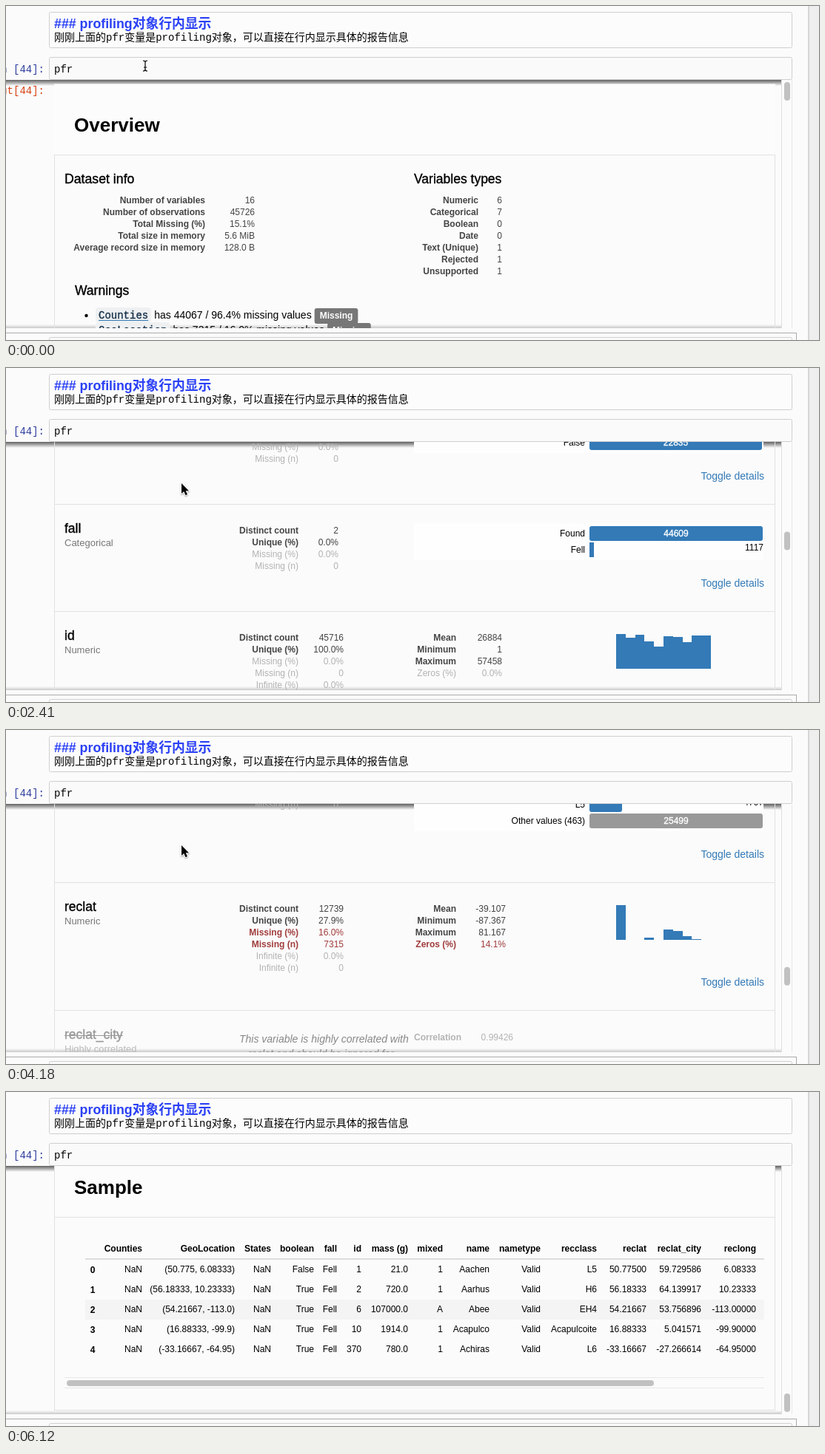
Animation, 1098 px wide and 452 px high, one loop 6.67 s. Source, as an HTML page with a canvas:

```html
<!DOCTYPE html>
<html lang="zh">
<head>
<meta charset="utf-8">
<title>Profiling report</title>
<style>
html, body { margin: 0; width: 100%; height: 100%; overflow: hidden; background: #fbfbfb; }
canvas { display: block; width: 1098px; height: 452px; }
</style>
</head>
<body>
<canvas id="stage" width="1098" height="452"></canvas>
<script>
const ctx = document.getElementById('stage').getContext('2d');
const LOOP = 6670;
const SANS = '"Liberation Sans", "Noto Sans CJK SC", "Noto Sans CJK", sans-serif';
const MONO = '"Liberation Mono", "Noto Sans CJK SC", "Noto Sans CJK", monospace';
const BLUE = '#337ab7', RED = '#a03c3c', PALE = '#b3b3b3', DARK = '#444', EDGE = '#e2e2e2';

// start, end, number of steps, value reached
const scrollKeys = [
  [500, 610, 2, 8], [760, 1080, 5, 32], [1190, 1340, 3, 260], [1430, 1520, 2, 470],
  [1970, 1970, 1, 544], [2060, 2410, 5, 1300], [2670, 3120, 6, 1944], [3440, 3790, 5, 2330],
  [4180, 4180, 1, 2387], [4270, 4630, 5, 3070], [4890, 4890, 1, 3146], [4980, 5070, 2, 3344]
];
const MAX_SCROLL = 3344;

function stepped(t, t0, t1, n) {
  if (t < t0) return 0;
  const k = t1 > t0 ? Math.floor((t - t0) / (t1 - t0) * (n - 1) + 1e-6) : n;
  return Math.min(1, (k + 1) / n);
}

function scrollAt(t) {
  let v = 0;
  for (const [t0, t1, n, to] of scrollKeys) v += (to - v) * stepped(t, t0, t1, n);
  return Math.round(v);
}

function pointerAt(t) {
  const a = stepped(t, 120, 320, 4), b = stepped(t, 5510, 6120, 11);
  return {
    x: 188 + 49 * a + 703 * b ** 1.4,
    y: 81 + 75 * a + 300 * b ** 1.5,
    shown: b < 1
  };
}

function text(str, x, y, o = {}) {
  const size = o.size || 12;
  ctx.font = `${o.italic ? 'italic ' : ''}${o.bold ? 'bold ' : ''}${size}px ${o.mono ? MONO : SANS}`;
  ctx.textAlign = o.align || 'left';
  ctx.fillStyle = o.color || '#000';
  const base = Math.round(y + size * 0.35);
  ctx.fillText(str, x, base);
  if (o.medium) {
    ctx.strokeStyle = ctx.fillStyle;
    ctx.lineWidth = 0.35;
    ctx.strokeText(str, x, base);
  }
  return ctx.measureText(str).width;
}

const right = (str, x, y, o) => text(str, x, y, { ...o, align: 'right' });

function rect(x, y, w, h, color) {
  ctx.fillStyle = color;
  ctx.fillRect(x, y, w, h);
}

function round(x, y, w, h, r, color) {
  ctx.fillStyle = color;
  ctx.beginPath();
  ctx.roundRect(x, y, w, h, r);
  ctx.fill();
}

function frame(x, y, w, h, fill, line) {
  round(x, y, w, h, 2, fill);
  ctx.strokeStyle = line;
  ctx.lineWidth = 1;
  ctx.beginPath();
  ctx.roundRect(x + 0.5, y + 0.5, w - 1, h - 1, 2);
  ctx.stroke();
}

const rule = (y, color = EDGE) => rect(65, y, 974, 1, color);

// rows: [label, value, color]
function table(rows, labelX, valueX, y) {
  rows.forEach(([label, value, color = DARK], i) => {
    right(label, labelX, y + i * 16, { bold: color !== PALE, color });
    right(value, valueX, y + i * 16, { color });
  });
}

function header(title, y, first) {
  rect(65, y, 974, 96, '#fcfcfc');
  rule(y, first ? EDGE : '#d9d9d9');
  text(title, 92, y + 56, { size: 26, bold: true });
  rule(y + 96);
}

const missing = (n, p) => [`has ${n} / ${p}% missing values`, 'Missing'];
const distinct = n => [`has a high cardinality: ${n} distinct values`, 'Warning'];
const zeros = (n, p) => [`has ${n} / ${p}% zeros`, 'Zeros'];
const warnings = [
  ['Counties', ...missing(44067, 96.4)],
  ['GeoLocation', ...missing(7315, '16.0')],
  ['GeoLocation', ...distinct(17101)],
  ['States', ...missing(44067, 96.4)],
  ['mass (g)', 'is highly skewed (γ1 = 76.918)', 'Skewed'],
  ['recclass', ...distinct(466)],
  ['reclat', ...missing(7315, '16.0')],
  ['reclat', ...zeros(6438, 14.1)],
  ['reclat_city', 'is highly correlated with reclat (ρ = 0.99426)', 'Rejected'],
  ['reclong', ...missing(7315, '16.0')],
  ['reclong', ...zeros(6214, 13.6)],
  ['year', 'is an unsupported type, check if it needs cleaning or further analysis', 'Warning']
];

function warning([name, msg, tag], y) {
  ctx.fillStyle = '#000';
  ctx.beginPath();
  ctx.arc(108.5, y + 1, 2.2, 0, 7);
  ctx.fill();
  const w = name.length * 8.4;
  round(121, y - 10, w + 8, 20, 4, '#eef0f1');
  text(name, 125, y, { size: 14, mono: true, color: '#17304a', medium: true });
  rect(125, y + 7, w, 1, BLUE);
  const x = 121 + w + 12;
  const end = x + text(msg, x, y, { size: 14 }) + 4;
  ctx.font = `bold 12px ${SANS}`;
  const tw = ctx.measureText(tag).width;
  round(end, y - 9, tw + 14, 21, 3, tag === 'Warning' ? '#f0ad4e' : '#777');
  text(tag, end + 7, y + 1, { bold: true, color: '#fff' });
}

function overview(y) {
  header('Overview', y, true);
  text('Dataset info', 79, y + 129, { size: 17.7, medium: true });
  text('Variables types', 551, y + 129, { size: 17.5, medium: true });
  table([['Number of variables', '16'], ['Number of observations', '45726'],
    ['Total Missing (%)', '15.1%'], ['Total size in memory', '5.6 MiB'],
    ['Average record size in memory', '128.0 B']], 269, 336, y + 158);
  table([['Numeric', '6'], ['Categorical', '7'], ['Boolean', '0'], ['Date', '0'],
    ['Text (Unique)', '1'], ['Rejected', '1'], ['Unsupported', '1']], 638, 670, y + 158);
  text('Warnings', 93, y + 280, { size: 17.5, medium: true });
  warnings.forEach((w, i) => warning(w, y + 313 + i * 20));
}

function caption(name, kind, y, muted) {
  const w = text(name, 79, y + 33, { size: 17.5, medium: true, color: muted ? '#999' : '#000' });
  if (muted) rect(79, y + 34, w, 1, '#999');
  text(kind, 79, y + 52, { size: 13, color: muted ? '#bbb' : '#777' });
}

const toggle = y => right('Toggle details', 1024, y, { size: 14, color: BLUE });

function counts(v, y, x) {
  const [count, unique, pct, n] = v;
  const c = n === '0' || n === '10' ? PALE : RED;
  table([['Distinct count', count], ['Unique (%)', unique],
    ['Missing (%)', pct, c], ['Missing (n)', n, c]], 395, x, y + 36);
}

function numeric(y, d) {
  caption(d.name, 'Numeric', y);
  counts(d.counts, y, 456);
  table([['Infinite (%)', '0.0%', PALE], ['Infinite (n)', '0', PALE]], 395, 456, y + 100);
  const [mean, min, max, zero] = d.stats;
  const zc = parseFloat(zero) > 5 ? RED : PALE;
  table([['Mean', mean], ['Minimum', min], ['Maximum', max], ['Zeros (%)', zero, zc]],
    608, d.edge || 670, y + 36);
  d.hist.forEach((h, i) => {
    const x = Math.round(824 + i * 12.8);
    rect(x, y + 78 - h, Math.round(824 + (i + 1) * 12.8) - x, h, BLUE);
  });
  toggle(y + 135);
}

function categorical(y, d) {
  caption(d.name, 'Categorical', y);
  counts(d.counts, y, 449);
  rect(551, y + 26, 472, d.bars.length * 22 + 6, '#fefefe');
  const peak = Math.max(...d.bars.map(b => b[1]));
  d.bars.forEach(([label, n], i) => {
    const by = y + 30 + i * 22, w = Math.max(3, Math.round(234 * n / peak));
    const lost = label === '(Missing)';
    const color = lost ? RED : label.startsWith('Other') ? '#999' : BLUE;
    right(label, 782, by + 10, { color: lost ? RED : '#000' });
    round(788, by, w, 20, w > 6 ? 3 : 0, color);
    if (w > 60) text(n, 788 + w / 2, by + 10, { align: 'center', color: '#fff', medium: true });
    else right(String(n), 1023, by + 7, { color: lost ? RED : '#000' });
  });
  toggle(y + d.h - 38);
}

function unique(y, d) {
  caption(d.name, 'Categorical, Unique', y);
  [['First 3 values', 315], ['Last 3 values', 551]].forEach(([s, x]) => {
    const w = text(s, x, y + 37, { bold: true, color: DARK });
    rect(x, y + 44, w, 1, '#222');
  });
  toggle(y + 79);
}

function excluded(y, d) {
  caption(d.name, d.kind, y, true);
  d.lines.forEach((s, i) => text(s, 315, y + 39 + i * 20, { size: 14, italic: true, color: '#888' }));
  if (d.value) {
    text('Correlation', 551, y + 37, { bold: true, color: PALE });
    right(d.value, 685, y + 37, { color: PALE });
  }
}

const num = (name, counts, stats, hist, edge) => ({ name, counts, stats, hist, edge, h: 173, draw: numeric });
const cat = (name, counts, bars) => ({ name, counts, bars, h: 101 + 22 * bars.length, draw: categorical });
const none = ['0.0%', '0'], some = ['0.0%', '10'], lost = ['16.0%', '7315'], most = ['96.4%', '44067'];

const variables = [
  num('Counties', ['663', '1.4%', ...most], ['1353.3', '5', '3210', '0.0%'], [47, 17, 31, 23, 11, 6, 36, 20, 11, 19]),
  cat('GeoLocation', ['17101', '37.4%', ...lost], [['(0.0, 0.0)', 6214], ['(-71.5, 35.66667)', 4761],
    ['(-84.0, 168.0)', 3040], ['Other values (17097)', 24396], ['(Missing)', 7315]]),
  num('States', ['46', '0.1%', ...most], ['17.7', '1', '51', '0.0%'], [12, 47, 20, 8, 10, 24, 6, 9, 5, 4]),
  cat('boolean', ['2', '0.0%', ...none], [['True', 22891], ['False', 22835]]),
  cat('fall', ['2', '0.0%', ...none], [['Found', 44609], ['Fell', 1117]]),
  num('id', ['45716', '100.0%', ...none], ['26884', '1', '57458', '0.0%'], [47, 42, 46, 37, 30, 44, 43, 36, 45, 45]),
  num('mass (g)', ['12577', '27.5%', '0.3%', '131'], ['13278', '0', '6e+07', '0.0%'], [47, 0, 0, 0, 0, 0, 0, 0, 0, 0]),
  cat('mixed', ['3', '0.0%', ...some], [['1', 23051], ['A', 22665], ['(Missing)', 10]]),
  { name: 'name', h: 117, draw: unique },
  cat('nametype', ['2', '0.0%', ...none], [['Valid', 45651], ['Relict', 75]]),
  cat('recclass', ['466', '1.0%', ...none], [['L6', 8287], ['H5', 7143], ['L5', 4797], ['Other values (463)', 25499]]),
  num('reclat', ['12739', '27.9%', ...lost], ['-39.107', '-87.367', '81.167', '14.1%'], [47, 0, 0, 3, 0, 14, 12, 5, 1, 0], 675),
  { name: 'reclat_city', kind: 'Highly correlated', h: 118, draw: excluded, value: '0.99426',
    lines: ['This variable is highly correlated with', '   reclat and should be ignored for', 'analysis'] },
  num('reclong', ['14641', '32.0%', ...lost], ['61.053', '-165.43', '354.47', '13.6%'], [1, 4, 5, 18, 26, 9, 2, 47, 0, 0], 675),
  cat('source', ['2', '0.0%', ...some], [['ARCH', 45716], ['(Missing)', 10]]),
  { name: 'year', kind: 'Unsupported', h: 118, draw: excluded,
    lines: ['This variable is an unsupported type,', 'check if it needs cleaning or further', 'analysis'] }
];

const columns = [['Counties', 184], ['GeoLocation', 309], ['States', 358], ['boolean', 416], ['fall', 447],
  ['id', 480], ['mass (g)', 543], ['mixed', 590], ['name', 653], ['nametype', 722], ['recclass', 798],
  ['reclat', 865], ['reclat_city', 939], ['reclong', 1013]];
const records = [
  'NaN|(50.775, 6.08333)|NaN|False|Fell|1|21.0|1|Aachen|Valid|L5|50.77500|59.729586|6.08333',
  'NaN|(56.18333, 10.23333)|NaN|True|Fell|2|720.0|1|Aarhus|Valid|H6|56.18333|64.139917|10.23333',
  'NaN|(54.21667, -113.0)|NaN|True|Fell|6|107000.0|A|Abee|Valid|EH4|54.21667|53.756896|-113.00000',
  'NaN|(16.88333, -99.9)|NaN|True|Fell|10|1914.0|1|Acapulco|Valid|Acapulcoite|16.88333|5.041571|-99.90000',
  'NaN|(-33.16667, -64.95)|NaN|True|Fell|370|780.0|1|Achiras|Valid|L6|-33.16667|-27.266614|-64.95000'
].map(r => r.split('|'));

function sample(y, pointerY) {
  const hover = Math.min(2, Math.floor((pointerY - y - 58) / 27));
  if (hover >= 0) rect(107, y + 58 + hover * 27, 917, 27, '#f4f4f4');
  columns.forEach(([s, x]) => right(s, x, y + 43, { bold: true }));
  rect(107, y + 56, 917, 2, '#dcdcdc');
  records.forEach((r, i) => {
    const ry = y + 71 + i * 27;
    text(i, 117, ry + 1, { bold: true, align: 'center' });
    r.forEach((s, j) => right(s, columns[j][1], ry));
  });
  rect(79, y + 217, 945, 1, '#e8e8e8');
  rect(79, y + 231, 945, 1, '#e8e8e8');
  round(82, y + 221, 793, 8, 4, '#c1c1c1');
  rule(y + 261);
}

function report(s, pointerY) {
  let y = 106 - s;
  rect(65, Math.max(100, y), 1, 3774 - s - Math.max(100, y), EDGE);
  rect(1038, Math.max(100, y), 1, 3774 - s - Math.max(100, y), EDGE);
  right('Out[44]:', 52, 114 - s, { size: 14, mono: true, color: '#d84315' });
  overview(105 - s);
  header('Variables', 686 - s);
  y = 782 - s;
  for (const v of variables) {
    if (y < 436 && y + v.h > 100) v.draw(y, v);
    y += v.h;
    rule(y);
  }
  header('Correlations', y);
  header('Sample', y + 97);
  rect(65, y, 1, 193, EDGE);
  rect(1038, y, 1, 193, EDGE);
  sample(y + 193, pointerY);
}

function shade(y0, y1, alpha) {
  const g = ctx.createLinearGradient(0, y0, 0, y1);
  g.addColorStop(0, `rgba(0,0,0,${alpha})`);
  g.addColorStop(1, 'rgba(0,0,0,0)');
  rect(0, Math.min(y0, y1), 1047, Math.abs(y1 - y0), g);
}

function notebook() {
  rect(0, 0, 1098, 452, '#fbfbfb');
  rect(1083, 0, 15, 452, '#eee');
  rect(1083, 0, 2, 452, '#d6d6d6');
  frame(58, 8, 1004, 49, '#fcfcfc', '#cfcfcf');
  text('### profiling对象行内显示', 65, 24, { size: 17.8, bold: true, color: '#2b40f5' });
  text('刚刚上面的pfr变量是profiling对象，可以直接在行内显示具体的报告信息', 65, 42, { size: 14, mono: true });
  frame(58, 69, 1004, 31, '#fafafa', '#cfcfcf');
  right('In [44]:', 52, 85, { size: 14, mono: true, color: '#303f9f' });
  text('pfr', 65, 85, { size: 14, mono: true });
  rect(0, 442, 1068, 1, '#ababab');
  rect(1067, 442, 1, 10, '#ababab');
  frame(58, 448, 1004, 20, '#fafafa', '#cfcfcf');
}

function pointer({ x, y, shown }) {
  if (!shown) return;
  ctx.save();
  ctx.translate(Math.round(x), Math.round(y));
  ctx.lineJoin = 'round';
  if (y < 100) {
    ctx.strokeStyle = '#000';
    ctx.lineWidth = 1.2;
    ctx.stroke(new Path2D('M-3 -7Q0 -7 0 -5V5Q0 7 -3 7M3 -7Q0 -7 0 -5M0 5Q0 7 3 7M-2 2H2'));
  } else {
    const arrow = new Path2D('M0 0V14L3.2 11L5.6 16.2L8 15L5.7 10.2H10Z');
    ctx.strokeStyle = '#fff';
    ctx.lineWidth = 2;
    ctx.shadowColor = 'rgba(0,0,0,.35)';
    ctx.shadowBlur = 2;
    ctx.shadowOffsetY = 1;
    ctx.stroke(arrow);
    ctx.shadowColor = 'transparent';
    ctx.fillStyle = '#000';
    ctx.fill(arrow);
  }
  ctx.restore();
}

function draw(t) {
  const s = scrollAt(t), p = pointerAt(t);
  notebook();
  ctx.save();
  ctx.beginPath();
  ctx.rect(0, 100, 1062, 336);
  ctx.clip();
  shade(100, 108, 0.62);
  shade(436, 431, 0.2);
  report(s, t < 5510 ? 0 : p.y);
  rect(1047, 100, 1, 336, '#e0e0e0');
  rect(1061, 100, 1, 336, '#e8e8e8');
  round(1051, 103 + 305 * s / MAX_SCROLL, 8, 25, 4, '#c1c1c1');
  ctx.restore();
  pointer(p);
}

const start = performance.now();
function tick() {
  draw((performance.now() - start) % LOOP);
  requestAnimationFrame(tick);
}
tick();
</script>
</body>
</html>
```
